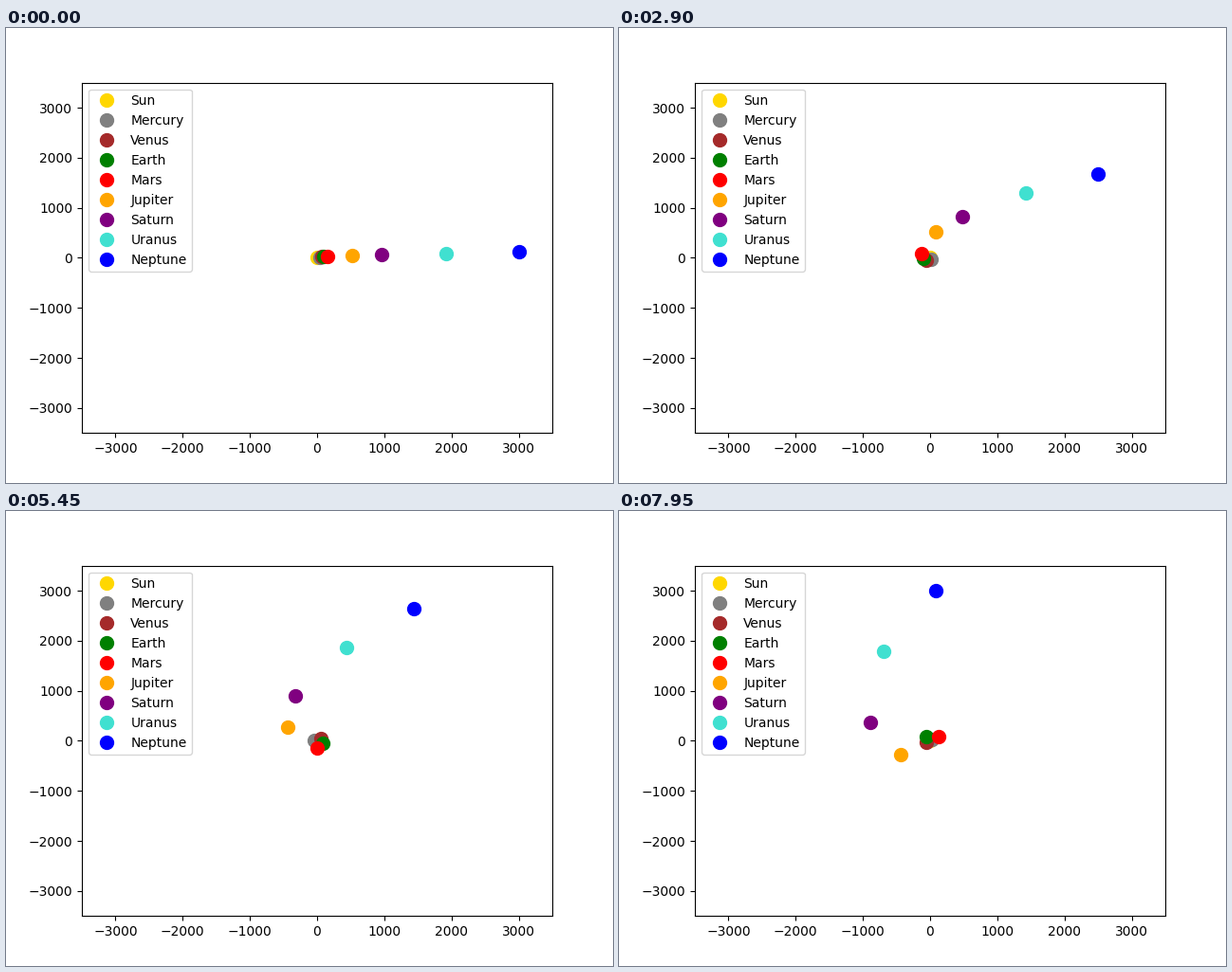
Write a matplotlib script that moves like this. It is 640x480 px and loops after 8 s.

```python
import numpy as np
import matplotlib.pyplot as plt
from matplotlib.animation import FuncAnimation

FRAMES = 160
INTERVAL = 50
LEAD = 4  # steps already travelled when the loop begins

# name, colour, orbit radius (AU), orbital speed (km/s)
BODIES = [
    ("Sun", "gold", 0, 0),
    ("Mercury", "gray", 0.39, 47.36),
    ("Venus", "brown", 0.72, 35.02),
    ("Earth", "green", 1.0, 29.78),
    ("Mars", "red", 1.52, 24.07),
    ("Jupiter", "orange", 5.2, 13.07),
    ("Saturn", "purple", 9.58, 9.69),
    ("Uranus", "turquoise", 19.2, 6.81),
    ("Neptune", "blue", 30.05, 5.43),
]

fig, ax = plt.subplots(figsize=(6.4, 4.8), dpi=100)
ax.set_xlim(-3500, 3500)
ax.set_ylim(-3500, 3500)

dots = [ax.plot([0], [0], "o", color=color, markersize=10, label=name)[0]
        for name, color, _, _ in BODIES]
ax.legend(loc="upper left")


def update(frame):
    for dot, (_, _, radius, speed) in zip(dots, BODIES):
        angle = np.radians(speed / 10 * (frame + LEAD))
        dot.set_data([100 * radius * np.cos(angle)],
                     [100 * radius * np.sin(angle)])
    return dots


def init():
    return update(0)


anim = FuncAnimation(fig, update, frames=FRAMES, init_func=init,
                     interval=INTERVAL, repeat=True, repeat_delay=0)
plt.show()
```
